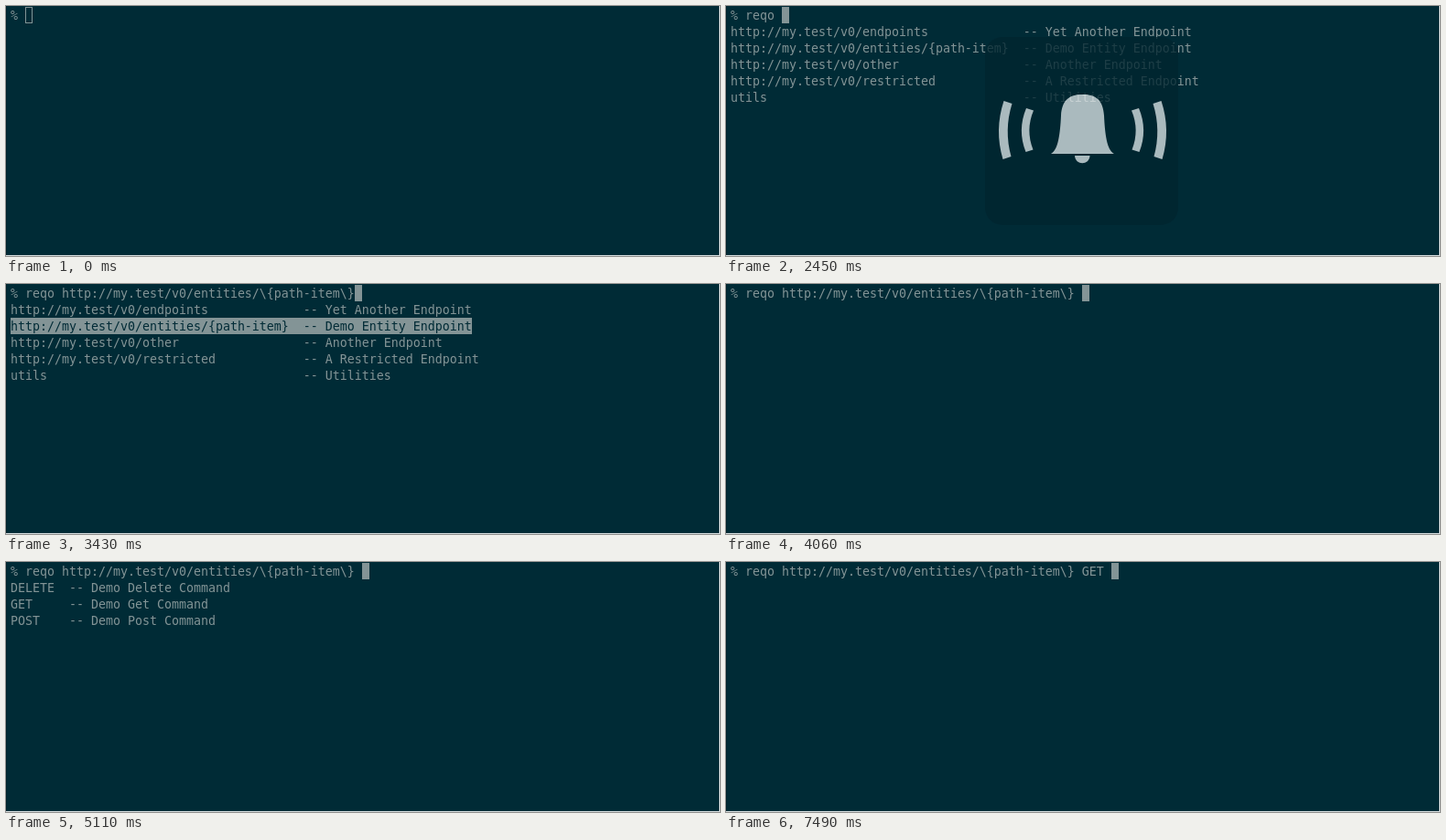
Animation, 780 px wide and 274 px high, one loop 8000 ms. Source, as an HTML page:

```html
<!DOCTYPE html>
<html lang="en">
<head>
<meta charset="utf-8">
<title>Terminal completion</title>
<style>
  html, body { margin: 0; width: 100%; height: 100%; overflow: hidden; background: #002b36; }
  svg { display: block; width: 780px; height: 274px; }
  text { font: 13.29px "DejaVu Sans Mono", "Liberation Mono", monospace; white-space: pre; fill: #839496; }
  .mark { fill: #839496; }
  text.on { fill: #002b36; }
  #cursor { stroke: #839496; }
</style>
</head>
<body>
<svg viewBox="0 0 780 274">
  <rect width="780" height="274" fill="#002b36"/>
  <rect width="1" height="274" fill="#00222b"/>
  <rect x="779" width="1" height="274" fill="#d5dcde"/>
  <rect y="273" width="780" height="1" fill="#d5dcde"/>
  <rect id="mark" class="mark" x="5" height="18"/>
  <g id="lines"></g>
  <rect id="cursor" y="1.5" width="7" height="17"/>
  <g id="bell" fill="#dde5e7">
    <rect x="283" y="34" width="211" height="206" rx="19" fill="#00252f"/>
    <path d="M355 162C363 158 365 140 366 120C367 104 374 97 389.5 97C405 97 412 104 413 120C414 140 416 158 424 162Z"/>
    <path d="M381 164H397.500C397 175 381.500 175 381 164Z"/>
    <path id="waves" d="M303.500 104Q293 136 302.500 168L311.500 165Q303.500 136 312.500 107ZM328 112Q318 136 327.500 160L335.500 157.500Q327 136 336 114.500Z"/>
    <use href="#waves" transform="matrix(-1 0 0 1 779 0)"/>
  </g>
</svg>
<script>
const LOOP = 8000, CELL = 8, LINE = 18, LEFT = 5, TOP = 1, BELL_STEP = 70;
const $ = id => document.getElementById(id);

const base = 'http://my.test/v0/';
const row = (name, note, width) => name.padEnd(width) + '-- ' + note;
const urls = [
  ['endpoints', 'Yet Another Endpoint'],
  ['entities/{path-item}', 'Demo Entity Endpoint'],
  ['other', 'Another Endpoint'],
  ['restricted', 'A Restricted Endpoint']
].map(([path, note]) => row(base + path, note, 40));
urls.push(row('utils', 'Utilities', 40));
const verbs = ['Delete', 'Get', 'Post']
  .map(verb => row(verb.toUpperCase(), `Demo ${verb} Command`, 8));

const tool = '% reqo ';
const entity = tool + base + 'entities/\\{path-item\\}';

// start time, command line, menu, highlighted menu row
const steps = [
  [0, '% '],
  [1120, '% r'],
  [1260, '% re'],
  [1470, '% req'],
  [1540, '% reqo'],
  [1680, tool],
  [2380, tool, urls],
  [3080, tool + base + 'endpoints', urls, 1],
  [3430, entity, urls, 2],
  [4060, entity + ' '],
  [4830, entity + ' ', verbs],
  [6090, entity + ' DELETE', verbs, 1],
  [6510, entity + ' GET', verbs, 2],
  [7490, entity + ' GET ']
];

const bells = [
  { start: 2380, end: 3080, levels: [1, .77, .52, .27, .03] },
  { start: 4830, end: 5110, levels: [1, .75, .5, .25] }
];

const lines = Array.from({ length: 6 }, (_, i) => {
  const line = document.createElementNS('http://www.w3.org/2000/svg', 'text');
  line.setAttribute('x', LEFT);
  line.setAttribute('y', TOP + i * LINE + 14);
  return $('lines').appendChild(line);
});

function showStep([, command, menu = [], selected = 0]) {
  const content = [command, ...menu];
  lines.forEach((line, i) => {
    line.textContent = content[i] || '';
    line.classList.toggle('on', selected > 0 && i === selected);
  });
  $('mark').setAttribute('y', TOP + selected * LINE);
  $('mark').setAttribute('width', selected ? content[selected].length * CELL : 0);
  $('cursor').setAttribute('x', LEFT + command.length * CELL + .5);
}

function bellLevel(time) {
  const bell = bells.find(b => time >= b.start && time < b.end);
  if (!bell) return 0;
  const index = Math.floor((time - bell.start) / BELL_STEP);
  return bell.levels[Math.min(index, bell.levels.length - 1)];
}

let current;
function draw() {
  const time = performance.now() % LOOP;
  const step = steps.filter(s => s[0] <= time).pop();
  if (step !== current) showStep(current = step);
  $('cursor').setAttribute('fill', time < 420 ? 'none' : '#839496');
  $('bell').setAttribute('opacity', bellLevel(time));
  requestAnimationFrame(draw);
}
draw();
</script>
</body>
</html>
```
